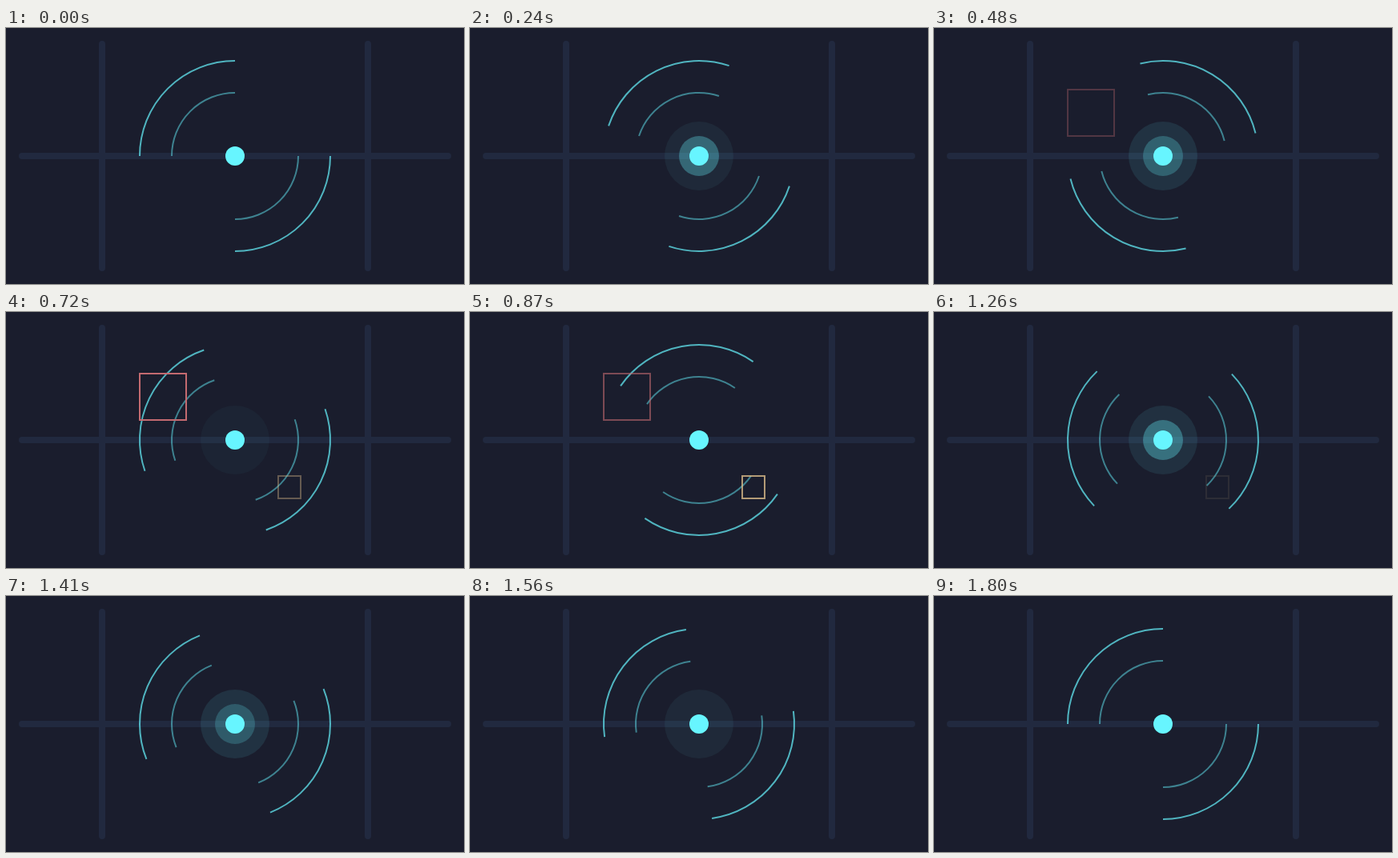
An HTML page with a canvas for the animation above (1830 ms loop, 572 px wide and 320 px high).

```html
<!DOCTYPE html>
<html lang="en">
<head>
<meta charset="utf-8">
<title>Radar</title>
<style>
  html, body { margin: 0; width: 100%; height: 100%; overflow: hidden; background: #1a1d2d; }
  canvas { display: block; }
</style>
</head>
<body>
<canvas id="stage" width="572" height="320"></canvas>
<script>
const ctx = document.getElementById('stage').getContext('2d');
const LOOP = 1830, SPIN = 1800, STEP = 30;
const CX = 286, CY = 160, CYAN = '#67f5ff';

// Cubic Bézier easing through (x1, 0) and (x2, 1), solved by bisection
function ease(x, x1, x2) {
  if (x <= 0 || x >= 1) return x <= 0 ? 0 : 1;
  let lo = 0, hi = 1, s = 0.5;
  for (let i = 0; i < 30; i++) {
    s = (lo + hi) / 2;
    const u = 1 - s;
    const bx = 3 * s * u * u * x1 + 3 * s * s * u * x2 + s * s * s;
    if (bx < x) lo = s; else hi = s;
  }
  return s * s * (3 - 2 * s);
}

// Triangle pulse: 0 at both ends, 1 in the middle
const tent = (x, from, span) => Math.max(0, 1 - Math.abs((x - from) / span * 2 - 1));

function bar(x1, y1, x2, y2) {
  ctx.beginPath();
  ctx.moveTo(x1, y1);
  ctx.lineTo(x2, y2);
  ctx.stroke();
}

function disc(r, alpha) {
  if (alpha <= 0) return;
  ctx.globalAlpha = alpha;
  ctx.fillStyle = CYAN;
  ctx.beginPath();
  ctx.arc(CX, CY, r, 0, Math.PI * 2);
  ctx.fill();
}

function arcs(r, angle, alpha) {
  ctx.globalAlpha = alpha;
  ctx.strokeStyle = CYAN;
  for (const start of [0, Math.PI]) {
    ctx.beginPath();
    ctx.arc(CX, CY, r, start + angle, start + angle + Math.PI / 2);
    ctx.stroke();
  }
}

function box(x, y, size, color, alpha) {
  if (alpha <= 0) return;
  ctx.globalAlpha = alpha;
  ctx.strokeStyle = color;
  ctx.strokeRect(x, y, size, size);
}

function draw(t) {
  const p = Math.min(1, t / SPIN);
  const beat = p * 2 % 1;

  ctx.globalAlpha = 1;
  ctx.fillStyle = '#1a1d2d';
  ctx.fillRect(0, 0, 572, 320);

  ctx.strokeStyle = '#21293f';
  ctx.lineWidth = 8;
  ctx.lineCap = 'round';
  bar(20, CY, 552, CY);
  bar(120, 20, 120, 300);
  bar(452, 20, 452, 300);

  ctx.lineWidth = 2;
  ctx.lineCap = 'butt';
  const angle = ease(p, 0.355, 0.455) * Math.PI * 2;
  arcs(119, angle, 0.7);
  arcs(79, angle, 0.47);

  disc(43, 0.1 * ease(tent(beat, 0, 1), 0.42, 0.58));
  disc(25, beat < 0.72 ? 0.33 * Math.sin(Math.PI * beat / 0.72) : 0);
  disc(12, 1);

  box(167, 77, 58, '#c46a70', tent(p, 0.2, 0.4));
  box(340, 205, 28, '#d6b887', tent(p, 0.32, 0.4));
}

const begin = performance.now();
function tick() {
  const t = (performance.now() - begin) % LOOP;
  draw(Math.floor(t / STEP) * STEP);
  requestAnimationFrame(tick);
}
tick();
</script>
</body>
</html>
```
